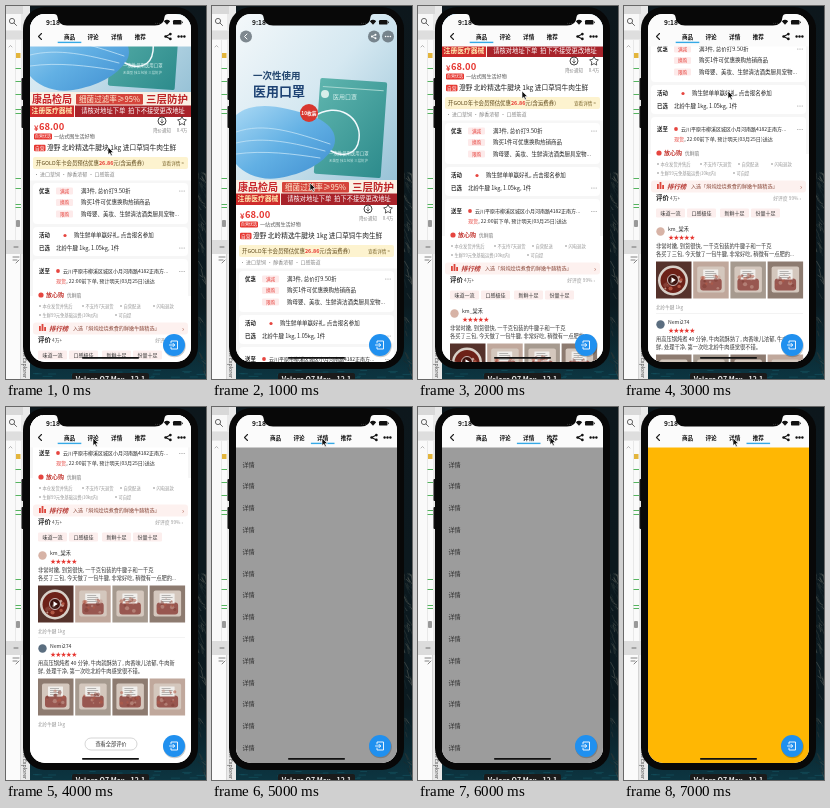
Animation, 200 px wide and 373 px high, one loop 8000 ms. Source, as an HTML page:

```html
<!DOCTYPE html>
<html lang="zh-CN">
<head>
<meta charset="utf-8">
<title>Shop page</title>
<style>
html, body { margin: 0; width: 100%; height: 100%; overflow: hidden; background: #0b151b; }
svg { display: block; width: 200px; height: 373px; }
text { font-family: "Noto Sans CJK SC", "Noto Sans CJK", "Noto Sans", sans-serif; white-space: pre; }
</style>
</head>
<body>
<svg id="stage" viewBox="0 0 200 373" xmlns="http://www.w3.org/2000/svg">
  <defs>
    <linearGradient id="photo" x1="0" y1="0" x2="1" y2="1">
      <stop offset="0" stop-color="#f4f8fa"/><stop offset=".45" stop-color="#d5e8f1"/><stop offset="1" stop-color="#8fbdd3"/>
    </linearGradient>
    <linearGradient id="mask" x1="0" y1="0" x2="1" y2="1">
      <stop offset="0" stop-color="#a8d8f4"/><stop offset=".5" stop-color="#62b0e4"/><stop offset="1" stop-color="#3f8ed0"/>
    </linearGradient>
    <linearGradient id="pack" x1="0" y1="0" x2="1" y2="1">
      <stop offset="0" stop-color="#5fb5ae"/><stop offset="1" stop-color="#2d8b8c"/>
    </linearGradient>
    <linearGradient id="sea" x1="0" y1="0" x2="0" y2="1">
      <stop offset="0" stop-color="#0d171c"/><stop offset=".8" stop-color="#0b1a20"/><stop offset="1" stop-color="#0c3541"/>
    </linearGradient>
    <clipPath id="screen"><rect x="24" y="8" width="161" height="348" rx="15"/></clipPath>
  </defs>
  <g id="desk"></g>
  <rect x="15.5" y="72" width="3" height="22" rx="1" fill="#111"/>
  <rect x="15.5" y="100" width="3" height="22" rx="1" fill="#111"/>
  <rect x="17" y="1" width="175" height="362" rx="22" fill="#080808"/>
  <g clip-path="url(#screen)">
    <rect x="24" y="8" width="161" height="348" fill="#fff"/>
    <g id="goods"></g>
    <g id="detail"></g>
    <rect id="more" x="24" y="40" width="161" height="316" fill="#ffb703"/>
    <g id="bar"></g>
    <g id="floatBar"></g>
    <g id="status"></g>
    <g id="fab"></g>
  </g>
  <path id="cursor" d="M0 0V7.6L1.8 6L3 8.8L4.3 8.2L3.1 5.5H5.5Z" fill="#111" stroke="#fff" stroke-width=".6"/>
</svg>
<script>
const $ = id => document.getElementById(id);
let layer;

function el(tag, attrs, parent = layer) {
  const node = document.createElementNS('http://www.w3.org/2000/svg', tag);
  for (const k in attrs) node.setAttribute(k, attrs[k]);
  return parent.appendChild(node);
}
const rect = (x, y, width, height, fill, rx = 0, more) => el('rect', { x, y, width, height, fill, rx, ...more });
const disc = (cx, cy, r, fill, more) => el('circle', { cx, cy, r, fill, ...more });
const path = (d, fill, more) => el('path', { d, fill, ...more });
const line = (d, stroke, width = 1) => path(d, 'none', { stroke, 'stroke-width': width, 'stroke-linecap': 'round', 'stroke-linejoin': 'round' });

// y is the middle of the line of text
function text(x, y, str, size, fill = '#222', more = {}) {
  const node = el('text', { x, y: y + size * .36, 'font-size': size, fill, ...more });
  node.textContent = str;
  return node;
}
const bold = { 'font-weight': 700 };
const mid = { 'text-anchor': 'middle' };

function random(seed) {
  return () => (seed = seed * 16807 % 2147483647) / 2147483647;
}

function badge(x, y, w, h, str, size, fill, color) {
  rect(x, y - h / 2, w, h, fill, 1.2);
  text(x + w / 2, y, str, size, color, mid);
}
const dots = (x, y, color, gap = 3, r = .9) => [-gap, 0, gap].forEach(d => disc(x + d, y, r, color));

function share(x, y, s, color) {
  line(`M${x + 2 * s} ${y - 2 * s}L${x - 2 * s} ${y}L${x + 2 * s} ${y + 2 * s}`, color, .9 * s);
  [[2, -2], [-2, 0], [2, 2]].forEach(([a, b]) => disc(x + a * s, y + b * s, 1.1 * s, color));
}

function drawDesk() {
  layer = $('desk');
  rect(0, 0, 200, 373, 'url(#sea)');
  const r = random(77);
  for (let i = 0; i < 70; i++) {
    const y = i < 45 ? 165 + r() * 75 : 240 + r() * 130, x = 190 + r() * 9;
    line(`M${x} ${y}l${1 + r() * 3} ${2 + r() * 6}`, ['#2c3536', '#48504d', '#1b2a2e'][i % 3], .7);
  }
  for (let i = 0; i < 24; i++) line(`M${25 + r() * 170} ${364 + r() * 8}h${2 + r() * 7}`, '#14505c', .7);
  rect(0, 0, 24, 373, '#e9e9e9');
  rect(0, 0, 17, 8, '#d8d8d8');
  rect(0, 8, 15, 16, '#f8f8f8');
  disc(6, 15, 2.6, 'none', { stroke: '#555', 'stroke-width': .9 });
  line('M8 17L10.5 19.5', '#555', .9);
  rect(0, 25, 17, 8, '#dedede');
  rect(0, 34, 15, 200, '#fafafa');
  rect(9, 34, .6, 200, '#ddd');
  line('M3 41l1.5-1.5l1.5 1.5', '#888', .6);
  rect(10, 47, 4.5, 5, '#e3b53c');
  [62, 75, 88, 103, 107, 172, 182, 198, 201].forEach(y => rect(9.5, y, 5.5, 1, '#55b45f'));
  rect(10, 214, 4, 7, '#999', 1);
  rect(0, 234, 17, 14, '#dcdcdc');
  line('M8 241h4', '#555', .8);
  rect(0, 248, 14, 125, '#fbfbfb');
  line('M7 251h6M7 254h4M10 257l3-3', '#666', .8);
  rect(14, 248, .6, 125, '#c8c8c8');
  text(0, 0, 'Device File Explorer', 5.2, '#444', { transform: 'translate(18.5 325) rotate(90)' });
  rect(66, 367, 77, 8, '#1b1b1b', 2);
  text(104.5, 373, 'Veloro Q7 Max - 12.1', 7, '#eee', { ...mid, ...bold });
}

function drawPhoto() {
  rect(24, 8, 161, 191, 'url(#photo)');
  rect(105, 74, 67, 96, 'url(#pack)', 2, { transform: 'rotate(4 138 122)' });
  rect(108, 82, 61, 1, '#a5d6d0', 0, { transform: 'rotate(4 138 122)' });
  disc(113, 88, 4, '#d7eeea');
  text(121, 91, '医用口罩', 6, '#d9f1ee');
  text(117, 147, '一次性使用医用口罩', 4.4, '#d9f1ee');
  text(117, 155, '无菌型 独立包装 三层防护', 3.4, '#c5e6e2');
  path('M24 109C42 95 68 99 102 111C119 117 127 130 121 142C111 158 91 168 67 172C49 175 32 168 24 158Z', 'url(#mask)');
  [0, 1, 2].forEach(i => line(`M24 ${126 + i * 11}C52 ${116 + i * 14} 82 ${126 + i * 11} ${118 - i * 5} ${138 + i * 7}`, '#c3e4f7', .8));
  line('M101 111C126 94 150 112 147 133C145 150 130 151 119 145', '#f3fafd', 1.5);
  text(41, 70, '一次性使用', 9.5, '#24476f', bold);
  text(41, 85, '医用口罩', 13, '#1d4273', bold);
  disc(97, 107, 9, '#d8372f');
  text(97, 107, '10枚装', 4.8, '#fff', { ...mid, ...bold });
  rect(24, 174, 161, 25, '#faf0e4');
  text(26, 181, '康品检局', 10, '#c8242a', bold);
  rect(24, 187.5, 44, 11.5, '#cf2b2b');
  text(46, 193, '注册医疗器械', 6.8, '#ffe9b0', { ...mid, ...bold });
  rect(70, 176, 67, 10.5, '#d5443b', 1);
  text(103.5, 181, '细菌过滤率≥95%', 7.6, '#fff1d6', mid);
  text(140, 181, '三层防护', 10.5, '#be2528', bold);
  rect(69, 187.5, 116, 11.5, '#a8232a');
  text(127, 193, '请核对地址下单  拍下不接受更改地址', 6.3, '#fff', mid);
}

function drawIntro() {
  const red = '#e6352f';
  text(28, 210, '¥', 7.5, red, bold);
  text(33, 208.5, '68.00', 9.4, red, bold);
  disc(156, 203, 4, 'none', { stroke: '#333', 'stroke-width': .9 });
  line('M156 201v4M154.5 203.5l1.5 1.5l1.5-1.5', '#333', .7);
  path('M176 198.5l1.4 2.8l3 .5l-2.2 2.2l.5 3.1l-2.7-1.5l-2.7 1.5l.5-3.1l-2.2-2.2l3-.5z', 'none', { stroke: '#333', 'stroke-width': .8 });
  text(156, 212, '降价通知', 4.4, '#888', mid);
  text(176, 212, '0.4万', 4.4, '#888', mid);
  badge(28, 218.5, 18, 6, '自营优选', 4.1, red, '#fff');
  text(48, 218.5, '一站式囤生活好物', 5.1, '#555');
  badge(28, 230, 11.5, 6.5, '自营', 4.8, red, '#fff');
  text(41, 230, '澄野 北岭精选牛腱块 1kg 进口草饲牛肉生鲜', 6.7, '#222', { 'font-weight': 500 });
  rect(27, 239, 155, 12, '#fdf3cf', 2);
  const offer = text(30, 245, '开GOLD年卡会员预估优惠', 5.4, '#5c4618', { 'font-weight': 500 });
  const price = el('tspan', { fill: red, 'font-weight': 700 }, offer);
  price.textContent = '26.86';
  el('tspan', {}, offer).textContent = '元(含运费券)';
  text(156, 245, '查看详情 >', 4.6, '#7a642c');
  text(28, 256.5, '• 进口草饲 • 醇香浓郁 • 口感筋道', 5, '#888');
}

function drawOptions() {
  const pink = '#fdeaea', red = '#e6453f';
  const label = (y, str) => text(33, y, str, 5.4, '#222', bold);
  rect(24, 262.5, 161, 116 - .5, '#f6f6f6');
  rect(27, 265, 155, 41, '#fff', 4);
  label(273, '优惠');
  [[273, '满减', '满3件, 总价打9.50折'], [284.5, '换购', '购买1件可优惠换购热销商品'], [296, '限购', '购母婴、美妆、生鲜清洁酒类厨具宠物...']]
    .forEach(([y, tag, str]) => { badge(50, y, 17, 7, tag, 4.6, pink, red); text(75, y, str, 5.5); });
  dots(176, 273, '#999', 2.2, .6);
  rect(27, 309, 155, 29, '#fff', 4);
  label(317.5, '活动');
  text(68, 317.5, '购生鲜单单赢好礼, 点击报名参加', 5.5);
  disc(59, 317.5, 1.6, red);
  label(330, '已选');
  text(50, 330, '北岭牛腱 1kg, 1.05kg, 1件', 5.5);
  dots(176, 330, '#999', 2.2, .6);
  rect(27, 341, 155, 62, '#fff', 4);
  label(353.5, '送至');
  disc(52, 353, 1.9, red);
  text(57, 353.5, '云川平原市柳溪区城区小月河南路4182正南方...', 5, '#222');
  dots(176, 353.5, '#999', 2.2, .6);
  const stock = text(50, 363.5, '现货', 5.1, red);
  el('tspan', { fill: '#333' }, stock).textContent = ', 22:00前下单, 预计明天(03月25日)送达';
  disc(35, 377, 2.6, red);
  text(40, 377, '放心购', 6, '#c2332d', bold);
  text(61, 377, '优鲜赔', 4.7, '#777');
  [[33, '京仓发货并售后'], [76, '不支持7天退货'], [114, '自营配送'], [147, '闪电退款']].forEach(([x, str]) => {
    disc(x + 1, 388, 1.1, '#bbb');
    text(x + 3.5, 388, str.replace('京', '本'), 4.3, '#999');
  });
  disc(34, 397, 1.1, '#bbb');
  text(36.5, 397, '生鲜99元免基础运费(10kg内)', 4.3, '#999');
  disc(110, 397, 1.1, '#bbb');
  text(112.5, 397, '可自提', 4.3, '#999');
}

function shot(x, y, kind, seed) {
  const w = 35.5, h = 37, r = random(seed);
  const base = ['#55322b', '#a69a8f', '#c0a89c', '#8d7b70'][kind];
  rect(x, y, w, h, base);
  if (kind === 0) {
    disc(x + 17, y + 19, 15, '#d8d0c8');
    disc(x + 17, y + 19, 12.5, '#6d2118');
  } else {
    rect(x + 4, y + 5, w - 8, h - 11, '#d4c7bd', 2);
    rect(x + 7, y + 17, w - 14, 12, '#985750', 3);
    rect(x + 10, y + 8, 15, 10, '#f0eeeb', .5);
    [10, 12, 14, 16].forEach(d => rect(x + 12, y + d, 11 - d % 4, .5, '#777'));
  }
  for (let i = 0; i < 14; i++) disc(x + 9 + r() * 17, y + 12 + r() * 15, .7 + r() * 1.5, ['#b65b47', '#803e35', '#c9a194'][i % 3], { opacity: kind ? .55 : .9 });
}

function review(y, name, lines, kinds, tone) {
  disc(36.5, y + 2, 4.2, tone);
  text(44, y, name, 5.2, '#333');
  for (let i = 0; i < 5; i++) text(47 + i * 5.3, y + 7, '★', 5.6, '#e6352f', mid);
  lines.forEach((s, i) => text(32, y + 17 + i * 7.2, s, 5.25, '#333'));
  kinds.forEach((k, i) => shot(32 + i * 37.2, y + 32, k, 31 + k * 9 + Math.round(y) + i));
  text(32, y + 78, '北岭牛腱 1kg', 4.6, '#999');
}

function drawReviews() {
  rect(24, 403, 161, 260, '#fff');
  rect(27, 404.5, 155, 12, '#fdf1ef', 3);
  rect(33, 408, 1.8, 5, '#dd453b');
  rect(35.6, 406, 1.8, 7, '#dd453b');
  rect(38.2, 409, 1.8, 4, '#dd453b');
  text(43, 410.5, '排行榜', 6.4, '#b5332d', { ...bold, 'font-style': 'italic' });
  text(67, 410.5, '入选「焖炖烩烧煮食的鲜嫩牛腩精选」', 5.1, '#8a4a3c');
  text(176, 410.5, '›', 7, '#a65548');
  text(32, 422, '评价', 6.4, '#222', bold);
  text(46, 422.5, '4万+', 4.8, '#555');
  text(177, 422, '好评度 99% ›', 4.8, '#999', { 'text-anchor': 'end' });
  ['味道一流', '口感极佳', '新鲜十足', '份量十足'].forEach((s, i) =>
    badge(32 + i * 31 + (i > 1 ? 2 : 0), 437, 29, 9, s, 5, '#fceeed', '#333'));
  review(453.5, 'km_棠禾', ['非常时嫩, 到货很快, 一千克包装的牛腱子和一千克', '各买了三包, 今天做了一包牛腱, 非常好吃, 稍微有一点肥的...'], [0, 2, 1, 3], '#d7b3a6');
  disc(49, 504, 5.5, 'rgba(0,0,0,.45)', { stroke: '#fff', 'stroke-width': .7 });
  path('M47.5 501.3v5.4l4.2-2.7z', '#fff');
  rect(32, 537, 147, .5, '#e6e6e6');
  review(546.5, 'Nemi274', ['用高压锅炖煮 40 分钟, 牛肉就酥熟了, 肉香味儿浓郁, 牛肉新', '鲜, 处理干净, 第一次吃北岭牛肉感觉很不错。'], [3, 1, 3, 2], '#5b6e80');
  rect(79, 638, 52, 12, '#fff', 6, { stroke: '#bbb', 'stroke-width': .6 });
  text(105, 644, '查看全部评价', 5.2, '#333', mid);
}

function drawShell() {
  layer = $('detail');
  rect(24, 40, 161, 316, '#9c9c9c');
  for (let i = 0; i < 14; i++) text(30.5, 57.5 + i * 21.8, '详情', 6.1, '#2b2b2b');

  layer = $('bar');
  rect(24, 8, 161, 32.5, '#fbfbfb');
  line('M35.5 27.5L32.5 30.5L35.5 33.5', '#222', 1.1);
  ['商品', '评论', '详情', '推荐'].forEach((s, i) => text(63.5 + i * 23.6, 30.5, s, 5.6, '#111', { ...mid, ...bold }));
  el('rect', { id: 'mark', y: 35.7, width: 23.6, height: 1.4, fill: '#35a9e6' });
  share(162, 30.5, 1.2, '#111');
  dots(175.5, 30.5, '#111', 2.9, 1.2);

  layer = $('floatBar');
  [34, 162, 176].forEach(x => disc(x, 30.5, 6, 'rgba(90,100,108,.75)'));
  line('M35 28L32.5 30.5L35 33', '#fff', 1);
  share(161.7, 30.5, .9, '#fff');
  dots(176, 30.5, '#fff', 2.4, .8);

  layer = $('status');
  path('M48 8Q51 8 51.5 11Q52 19.5 61 19.5H149Q158 19.5 158.5 11Q159 8 162 8Z', '#080808');
  text(40, 16.5, '9:18', 6.6, '#111', { ...bold, 'font-family': 'Inter, sans-serif' });
  dots(151.5, 17.3, '#444', 1.8, .5);
  path('M157.8 15.2Q161 12.4 164.2 15.2L161 18.8Z', '#111');
  rect(167, 14, 8.5, 4.6, '#111', 1.2);
  rect(176, 15.4, .8, 1.8, '#111', .4);

  layer = $('fab');
  disc(168.5, 340, 11.3, 'rgba(0,0,0,.2)');
  disc(168, 339, 11, '#2090ef');
  line('M165 337v-2h6.5v8H165v-2M163.5 339h5M167 337.3l1.7 1.7l-1.7 1.7', '#fff', .9);
  rect(76, 351, 57, 1.7, '#111', .8);
}

drawDesk();
layer = $('goods');
drawPhoto();
drawIntro();
drawOptions();
drawReviews();
drawShell();

// one row per second: page, tab, scroll, cursor x, cursor y
const steps = [
  ['goods', 0, 88, 102, 141],
  ['goods', 0, 0, 98, 177],
  ['goods', 0, 148, 104, 85],
  ['goods', 0, 230, 104, 85],
  ['goods', 0, 307, 87, 31],
  ['detail', 2, 307, 110, 31],
  ['detail', 2, 307, 132, 30],
  ['more', 3, 307, 109, 31]
];
const show = (id, on) => $(id).setAttribute('visibility', on ? 'visible' : 'hidden');
const start = performance.now();
let shown = -1;

function tick() {
  const i = Math.floor((performance.now() - start) % 8000 / 1000);
  if (i !== shown) {
    shown = i;
    const [page, tab, scroll, x, y] = steps[i];
    ['goods', 'detail', 'more'].forEach(id => show(id, id === page));
    show('bar', scroll > 0);
    show('floatBar', scroll === 0);
    $('goods').setAttribute('transform', `translate(0 ${-scroll})`);
    $('mark').setAttribute('x', 51.7 + tab * 23.6);
    $('cursor').setAttribute('transform', `translate(${x} ${y})`);
  }
  requestAnimationFrame(tick);
}
tick();
</script>
</body>
</html>
```
